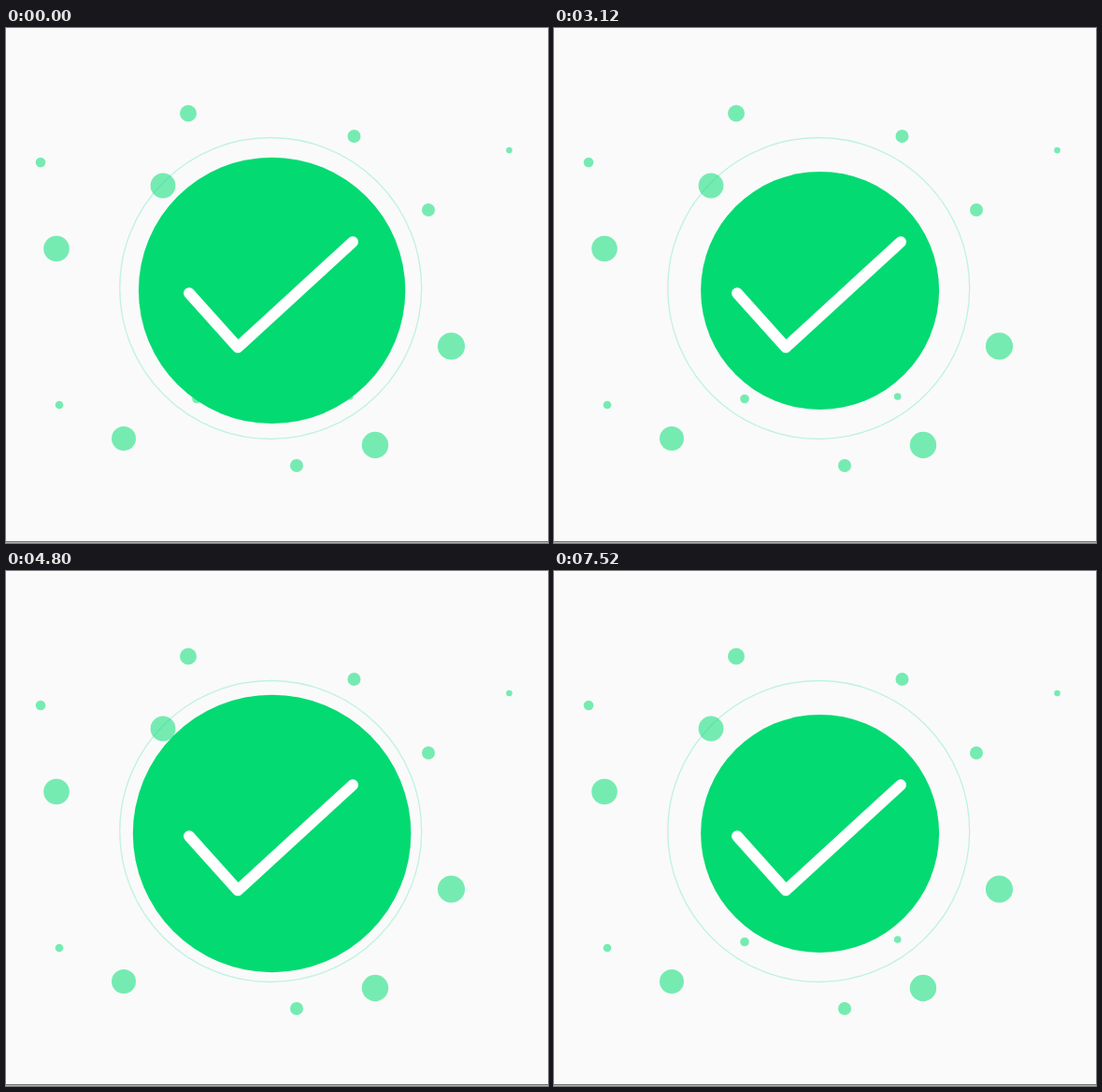
Animation of 580 by 552 pixels, one loop 7.6 s. Source, as an HTML page:

```html
<!DOCTYPE html>
<html lang="en">
<head>
<meta charset="utf-8">
<title>Success check</title>
<style>
  html, body { margin: 0; width: 100%; height: 100%; overflow: hidden; background: #fafafa; }
  svg { display: block; }
</style>
</head>
<body>
<svg width="580" height="552" viewBox="0 0 580 552">
  <rect width="580" height="552" fill="#fafafa"/>
  <g id="dots" fill="#75ebb2"></g>
  <circle cx="283.2" cy="279" r="161.5" fill="none" stroke="#04da93" stroke-opacity=".24" stroke-width="1.3"/>
  <circle id="disc" cx="284.6" cy="281.4" fill="#03da72"/>
  <path id="check" d="M196 284.3L248 342.3L371 229.3" fill="none" stroke="#fff" stroke-width="12"
        stroke-linecap="round" stroke-linejoin="round"/>
  <rect y="550" width="580" height="1.5" fill="#707070"/>
</svg>
<script>
const LOOP = 7600;
const PERIOD = 5040, LEAD = 1320;
const RISE = 950, FALL = 975;
const REST_RADIUS = 127.5, GROWTH = 22.25;

const byId = id => document.getElementById(id);
const disc = byId('disc'), check = byId('check');
const length = check.getTotalLength();

// Scatters dots whose radius grows by a fixed step from one to the next.
function scatter(places, radius, step = 0) {
  places.split(' ').forEach((place, i) => {
    const [x, y] = place.split(',');
    byId('dots').innerHTML += `<circle cx="${x}" cy="${y}" r="${radius + step * i}"/>`;
  });
}
scatter('538.5,131 367.7,395 57,404 204,397.5 37,144', 3.3, 0.5);
scatter('372.5,116 452,195 311,469', 7);
scatter('195,91.5', 9);
scatter('126,440 168,169 54,236.5 395,447 476.5,341', 13, 0.4);

const ease = x => (1 - Math.cos(Math.PI * Math.min(1, Math.max(0, x)))) / 2;

function render(t) {
  const age = (t + LEAD) % PERIOD;
  const drawn = ease(age / RISE);
  const swell = drawn - ease((age - RISE) / FALL);
  disc.setAttribute('r', REST_RADIUS + GROWTH * swell);
  check.setAttribute('stroke-dasharray', drawn < 1 ? `${drawn * length} ${length * 2}` : 'none');
  check.setAttribute('visibility', drawn > 0.001 ? 'visible' : 'hidden');
}

const origin = performance.now();
function tick() {
  render((performance.now() - origin) % LOOP);
  requestAnimationFrame(tick);
}
tick();
</script>
</body>
</html>
```
